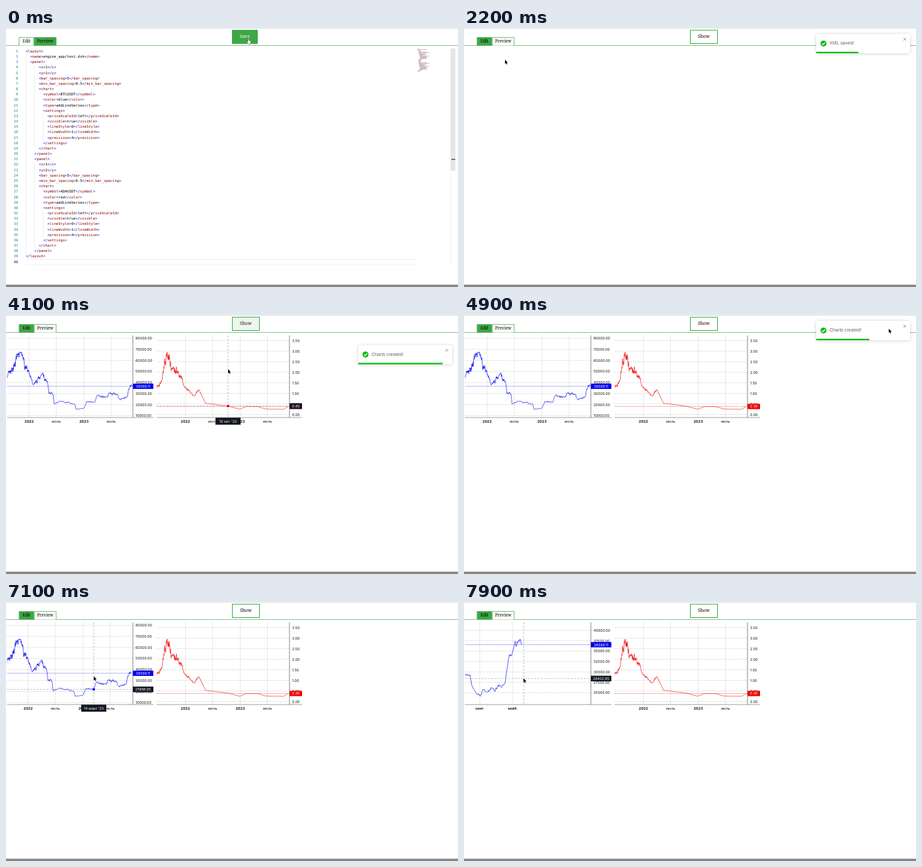
An HTML page with a canvas that plays this animation: 684x392 px, repeating every 8000 ms.

```html
<!DOCTYPE html>
<html lang="en">
<head>
<meta charset="utf-8">
<title>Chart layout editor</title>
<style>
html, body { margin: 0; width: 684px; height: 392px; overflow: hidden; background: #fff; }
canvas { display: block; width: 684px; height: 392px; }
</style>
</head>
<body>
<canvas id="stage"></canvas>
<script>
const LOOP = 8000, GREEN = '#3ea746', DAY = 864e5;
const SERIF = '"Noto Serif", serif', SANS = '"Liberation Sans", sans-serif';
const MONO = '5.45px "DejaVu Sans Mono", monospace', AXIS = '5.4px Inter, sans-serif';
const canvas = document.getElementById('stage'), ratio = window.devicePixelRatio || 1;
canvas.width = 684 * ratio;
canvas.height = 392 * ratio;
const c = canvas.getContext('2d');
c.scale(ratio, ratio);
c.textBaseline = 'middle';

const clamp = (v, a = 0, b = 1) => Math.min(b, Math.max(a, v));
const mix = (a, b, u) => a + (b - a) * u;
const ramp = (t, a, b) => {
  const u = clamp((t - a) / (b - a));
  return u * u * (3 - 2 * u);
};

function rect(x, y, w, h, color) {
  c.fillStyle = color;
  c.fillRect(x, y, w, h);
}

function text(s, x, y, font, color, align = 'left') {
  c.font = font;
  c.fillStyle = color;
  c.textAlign = align;
  c.fillText(s, x, y);
}

function path(points, color, width = 0.5, dash = []) {
  c.strokeStyle = color;
  c.lineWidth = width;
  c.setLineDash(dash);
  c.beginPath();
  points.forEach(([x, y]) => c.lineTo(x, y));
  c.stroke();
  c.setLineDash([]);
}
const line = (x1, y1, x2, y2, ...style) => path([[x1, y1], [x2, y2]], ...style);

function dot(x, y, r, color) {
  c.fillStyle = color;
  c.beginPath();
  c.arc(x, y, r, 0, 7);
  c.fill();
}

// ---- Editor ----
const tag = (pad, name, value) => ' '.repeat(pad) + `<${name}>${value}</${name}>`;
const panel = (pad, row, symbol, color) => [
  ' '.repeat(pad) + '<panel>',
  tag(6, 'x', 1), tag(6, 'y', row), tag(6, 'bar_spacing', 5), tag(6, 'min_bar_spacing', 0.5),
  '      <chart>',
  tag(8, 'symbol', symbol), tag(8, 'color', color), tag(8, 'type', 'addLineSeries'),
  '        <settings>',
  tag(10, 'priceScaleId', 'left'), tag(10, 'visible', true), tag(10, 'lineStyle', 0),
  tag(10, 'lineWidth', 1), tag(10, 'precision', 4),
  '        </settings>', '      </chart>', '    </panel>'
];
const source = ['<layout>', tag(2, 'name', 'engine_app/test.dsh'),
  ...panel(2, 1, 'BTCUSDT', 'blue'), ...panel(4, 2, 'ADAUSDT', 'red'), '</layout>', ''];

function tokens(row) {
  let col = 0, open = false;
  return row.split(/(<\/?|>)/).map(s => {
    const mark = /^(<\/?|>)$/.test(s);
    const token = { s, col, color: mark ? '#0000e0' : open ? '#800000' : '#000' };
    if (mark) open = s !== '>';
    col += s.length;
    return token;
  }).filter(k => k.s.trim());
}
const code = source.map(tokens);

function drawEditor() {
  const ch = 3.28;
  code.forEach((row, i) => {
    const y = 35.5 + i * 8.17, indent = source[i].search(/\S/);
    for (let col = 0; col < indent; col += 4) line(30 + col * ch, y - 4, 30 + col * ch, y + 4.2, '#d8d8d8');
    text(i + 1, 18.3, y, MONO, i === 39 ? '#0b216f' : '#237893', 'right');
    for (const k of row) {
      text(k.s, 30 + k.col * ch, y, MONO, k.color);
      c.globalAlpha = 0.45;
      rect(622 + k.col * 0.43, 31.7 + i * 0.89, k.s.length * 0.43, 0.6, k.color);
      c.globalAlpha = 1;
    }
  });
  line(30, 350.3, 619, 350.3, '#ddd');
  line(30, 358, 619, 358, '#ddd');
  line(672.7, 31, 672.7, 360, '#e4e4e4');
  rect(673, 31, 7, 185, '#e6e6e6');
  rect(674, 198.2, 6, 1.2, '#333');
}

// ---- Charts ----
const PX_DAY = 0.2274, ZOOMED = 0.82, LOW_Y = 142.6, SPAN_Y = 86.6;
const LAST_DATE = Date.UTC(2023, 10, 17);
const MONTHS = ['янв.', 'февр.', 'март', 'апр.', 'май', 'июнь', 'июль', 'авг.', 'сент.', 'окт.', 'нояб.', 'дек.'];

// Random walk through [day, price] turning points: jitter grows with price, vanishes at each point.
function daily(turns, jitter, seed) {
  const prices = turns.map(p => p[1]), lo = Math.min(...prices), hi = Math.max(...prices);
  const rnd = () => (seed = seed * 16807 % 2147483647) / 1073741823.5 - 1;
  const out = [];
  let n = 0;
  turns.slice(1).forEach(([d1, v1], i) => {
    const [d0, v0] = turns[i];
    for (let d = d0; d < d1; d++) {
      const f = (d - d0) / (d1 - d0), v = mix(v0, v1, f);
      n = 0.8 * n + rnd() * jitter * v / hi;
      out.push({ d, v: clamp(v * (1 + n * Math.sin(Math.PI * f) ** 0.5), lo, hi) });
    }
  });
  const [d, v] = turns[turns.length - 1];
  return [...out, { d, v }];
}

const blue = {
  x: 1.5, right: 192, axisW: 31, color: '#0000f0', unit: 1000,
  data: daily([[-835, 45], [-738, 67.6], [-658, 38], [-597, 47.5], [-562, 40], [-553, 30], [-526, 29.5],
    [-518, 20.5], [-478, 23], [-381, 20.3], [-372, 15.8], [-320, 16.6], [-302, 22.8], [-248, 21.99805],
    [-232, 28.3], [-166, 26.4], [-153, 30.5], [-95, 29.3], [-90, 26.2], [-66, 25.3], [-30, 27.4],
    [-24, 33.3], [-2, 37.8], [0, 36.56811]], 0.055, 77)
};
const red = {
  x: 228, right: 429, axisW: 19, color: '#f00000', unit: 1,
  data: daily([[-880, 1.2], [-841, 1.6], [-806, 2.96], [-775, 2.2], [-731, 2.05], [-691, 1.3], [-625, 0.87],
    [-595, 1.18], [-551, 0.53], [-401, 0.4], [-322, 0.25], [-278, 0.38], [-199, 0.37], [-150, 0.26],
    [-30, 0.25], [0, 0.38]], 0.09, 41)
};

function badge(x, y, w, h, s, color) {
  rect(x, y - h / 2, w, h, color);
  text(s, x + w / 2, y + 0.3, AXIS, '#fff', 'center');
}

function drawChart(ch, last, px, [mx, my]) {
  const X = d => last + d * px, { x: left, right, axisW, color, unit, data } = ch;
  const seen = data.filter(p => X(p.d) >= left).map(p => p.v);
  const lo = Math.min(...seen), hi = Math.max(...seen), k = SPAN_Y / (hi - lo);
  const Y = v => LOW_Y - (v - lo) * k;
  const price = v => (v * unit).toFixed(2);

  const step = [0.5, 1, 2.5, 5, 10].find(s => s * k > 15);
  for (let v = 0; v <= 100; v += step) {
    const y = Y(v);
    if (y < 33 || y > 153) continue;
    line(left, y, right, y, '#bbb', 0.5, [2, 1]);
    text(price(v), right + 4, y + 0.3, AXIS, '#111');
  }
  const close = px > 0.45;
  for (let m = 6; m < 35; m += close ? 2 : 6) {
    const x = X((Date.UTC(2021, m, 1) - LAST_DATE) / DAY);
    if (x < left + 8 || x > right - 8) continue;
    line(x, 31, x, 155, '#bbb', 0.5, [2, 1]);
    const bold = close || m % 12 === 0 ? 'bold ' : '';
    text(m % 12 ? MONTHS[m % 12] : 2021 + m / 12, x, 161.5, bold + AXIS, '#111', 'center');
  }

  const end = data[data.length - 1], endY = Y(end.v);
  c.save();
  c.beginPath();
  c.rect(left, 31, right - left, 124);
  c.clip();
  path(data.map(p => [X(p.d), Y(p.v)]), color, 0.65);
  line(left, endY, right, endY, color, 0.6, [1, 1]);
  c.restore();

  line(left, 155.2, right + axisW, 155.2, '#666', 0.6);
  line(right, 31, right, 155.2, '#555', 0.7);
  badge(right, endY, axisW, 8, price(end.v), color);

  if (mx < left || mx > right || my < 31 || my > 155) return;
  const day = Math.round((mx - last) / px), hit = data.find(p => p.d === day);
  const x = hit ? X(day) : mx + 0.5, y = hit ? Y(hit.v) : my + 0.3;
  line(x, 31, x, 155, '#9598a1', 0.6, [3, 2]);
  line(left, y, right, y, '#9598a1', 0.6, [3, 2]);
  badge(right, y, axisW, 8.5, price(lo + (LOW_Y - y) / k), '#131722');
  if (!hit) return;
  dot(x, y, 2, color);
  const date = new Date(LAST_DATE + day * DAY);
  const label = `${date.getUTCDate()} ${MONTHS[date.getUTCMonth()]} '${date.getUTCFullYear() % 100}`;
  badge(x - 19, 160.7, 38, 10.6, label, '#131722');
}

// ---- Page chrome ----
function drawTab(s, x, w, active) {
  rect(x, 14, w, 12.5, active ? '#fff' : GREEN);
  if (active) path([[x + 0.4, 27], [x + 0.4, 14.3], [x + w - 0.4, 14.3], [x + w - 0.4, 27]], GREEN, 0.8);
  text(s, x + w / 2, 20.4, `500 6.4px ${SERIF}`, '#000', 'center');
}

const hovers = [[-1000, 150], [2860, 3850]];
const hoverLevel = t => Math.max(...hovers.map(([a, b]) => clamp(Math.min((t - a) / 280, 1 - (t - b) / 280))));

function drawButton(s, w, level) {
  c.globalAlpha = level;
  rect(342, 3, w, 21, GREEN);
  c.globalAlpha = 1;
  c.strokeStyle = GREEN;
  c.lineWidth = 1;
  c.strokeRect(342.5, 3.3, w - 1, 20.2);
  const tone = Math.round(255 * level);
  text(s, 342 + w / 2, 13.5, `500 6.8px ${SERIF}`, `rgb(${tone},${tone},${tone})`, 'center');
}

// Slides in from the right with a damped overshoot; leaves with a short pull back.
function toastShift(t, enter, leave) {
  const u = clamp((t - enter) / 700), v = clamp((t - leave) / 700);
  const arrive = u < 0.6 ? mix(1330, -11, u / 0.6) : -11 * Math.cos((u - 0.6) * 15.7) * ((1 - u) / 0.4);
  return arrive + (v < 0.2 ? -45 * v : mix(-9, 880, (v - 0.2) / 0.8));
}

function drawToast(t, s, y, enter, leave) {
  if (t < enter || t > leave + 700) return;
  c.save();
  c.translate(533 + toastShift(t, enter, leave), y);
  c.shadowColor = 'rgba(0,0,0,.2)';
  c.shadowBlur = 5 * ratio;
  c.shadowOffsetY = 0.5 * ratio;
  c.fillStyle = '#fff';
  c.beginPath();
  c.roundRect(0, 0, 142, 29.2, 1.8);
  c.fill();
  c.shadowColor = 'transparent';
  dot(11, 14.4, 4.5, '#07bc0c');
  path([[8.7, 14.5], [10.4, 16.3], [13.5, 12.6]], '#fff', 1.2);
  text(s, 20, 14.4, `7.1px ${SANS}`, '#666');
  line(132, 6, 136, 10, '#888', 0.8);
  line(136, 6, 132, 10, '#888', 0.8);
  rect(0, 27, 142 * clamp(1 - (t - enter - 750) / 2400), 2.2, '#07bc0c');
  c.restore();
}

// ---- Pointer: each move is [start, end, x, y] ----
const moves = [
  [100, 900, 59, 19], [1050, 1700, 62, 48], [2250, 2900, 366, 16], [3760, 4050, 336, 82],
  [4150, 5050, 667, 16], [5500, 5800, 638, 19.5], [5800, 6800, 132.8, 112.5], [7100, 7850, 90, 115.5]
];
const pointerAt = t => moves.reduce(([px, py], [a, b, x, y]) => {
  const u = ramp(t, a, b);
  return [mix(px, x, u), mix(py, y, u)];
}, [366, 16]);
const arrow = new Path2D('M0 0V6.2L1.5 4.9 2.5 7.2 3.5 6.8 2.5 4.6 4.4 4.5Z');
const hand = new Path2D('M0 .6Q.7-.4 1.4.6V3L4 3.6Q4.8 4 4.5 5.2L3.8 8H.6L-1.6 5Q-1.6 4-.8 4.3L0 5Z');

function drawPointer(t, [x, y]) {
  const pointing = hovers.some(([a, b]) => t >= a && t < b) || (t > 850 && t < 1100);
  const shape = pointing ? hand : arrow;
  c.save();
  c.translate(x, y);
  c.lineWidth = 0.9;
  c.strokeStyle = pointing ? '#000' : '#fff';
  c.stroke(shape);
  c.fillStyle = pointing ? '#fff' : '#000';
  c.fill(shape);
  c.restore();
}

function draw(t) {
  const pointer = pointerAt(t), editing = t < 1000;
  rect(0, 0, 684, 392, '#fff');
  line(0, 0.5, 684, 0.5, '#e4e4e4', 1);
  line(0, 26.5, 684, 26.5, GREEN, 0.65);
  drawTab('Edit', 19.5, 23, editing);
  drawTab('Preview', 42.5, 33.8, !editing);
  drawButton(editing ? 'Save' : 'Show', editing ? 39 : 42, hoverLevel(t));
  if (editing) drawEditor();
  if (t >= 3800) {
    const u = ramp(t, 7100, 7850), start = t >= 7100 ? 189.2 : 190.7;
    drawChart(blue, mix(start, 87, u), PX_DAY * (ZOOMED / PX_DAY) ** u, pointer);
    drawChart(red, 427.2, PX_DAY, pointer);
  }
  rect(0, 388.5, 684, 3.5, '#858585');
  drawToast(t, 'XML saved!', 9, 130, 3700);
  drawToast(t, 'Charts created!', mix(45.4, 9, ramp(t, 4200, 4480)), 3110, 5150);
  drawPointer(t, pointer);
}

const began = performance.now();
function tick() {
  draw((performance.now() - began) % LOOP);
  requestAnimationFrame(tick);
}
tick();
</script>
</body>
</html>
```
